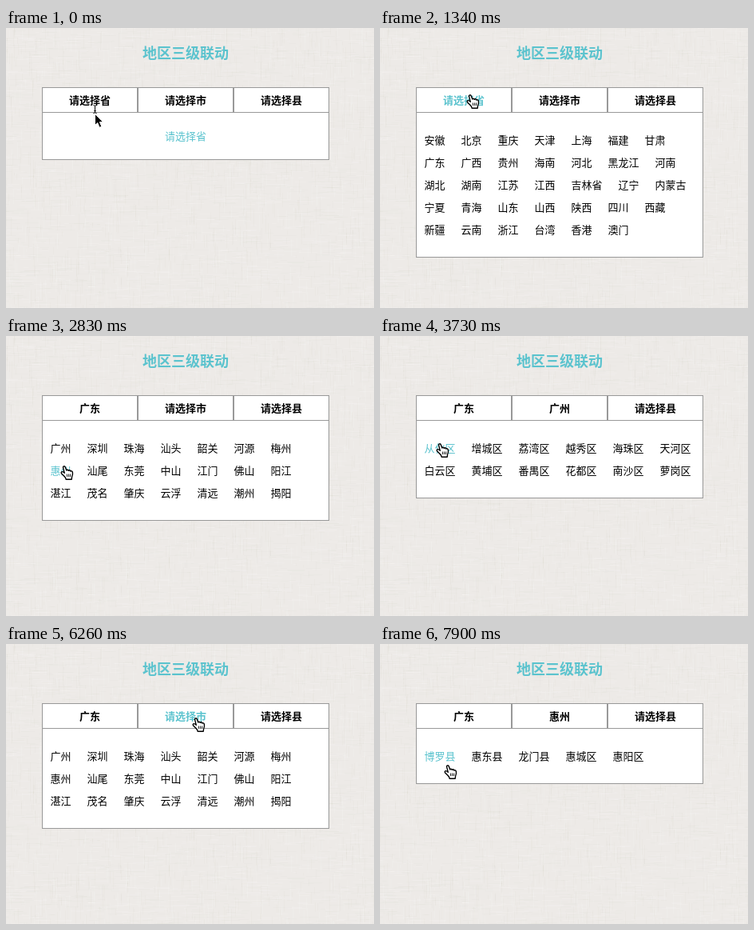
Write an HTML page with a canvas that moves like this. It is 461 px wide and 350 px high and loops after 8 s.

```html
<!DOCTYPE html>
<html lang="zh-CN">
<head>
<meta charset="utf-8">
<title>地区三级联动</title>
<style>
html, body { margin: 0; width: 100%; height: 100%; overflow: hidden; background: #edeae7; }
canvas, svg { position: absolute; left: 0; top: 0; display: block; }
text { font: 13px "Noto Sans CJK SC", "Noto Sans CJK", sans-serif; fill: #000; white-space: pre; }
.mid { text-anchor: middle; }
.bold { font-weight: 700; }
.title { font-size: 18px; }
.on { fill: #5bc3ce; }
.box { fill: #fff; stroke: #999; }
</style>
</head>
<body>
<canvas id="linen" width="461" height="350"></canvas>
<svg width="461" height="350" viewBox="0 0 461 350">
  <defs>
    <g id="hand">
      <path d="M3.6 2.6C3.1 .7 5.6 .1 6.3 1.9L7.8 6.1C8 5 9.9 5 10.3 6.4C10.7 5.4 12.5 5.6 12.8 7C13.5 6.2 15.1 6.8 15.4 8.3C15.8 10.5 15.5 12.2 14.6 14L14.2 17.2H7.2L6.4 15C5 13 3.2 11.6 1.4 9.7C.6 8.2 2.2 7 3.7 8L5.3 9.3Z" fill="#fff" stroke="#000" stroke-width="1.4" stroke-linejoin="round"/>
      <path d="M8.3 10.5L8.7 14M10.5 10.5L10.7 14M12.6 10.5V14" fill="none" stroke="#000" stroke-width=".9"/>
    </g>
    <path id="arrow" d="M0 0V14L3.2 11.1L5.6 16.8L8.3 15.7L5.9 10.1H10.2Z" fill="#000" stroke="#fff"/>
    <path id="beam" d="M-2 -5Q0 -5 0 -3.8Q0 -5 2 -5M0 -4V4M-2 5Q0 5 0 3.8Q0 5 2 5M-1.2 2H1.2" fill="none" stroke="#000"/>
  </defs>
  <text class="mid bold title on" x="225" y="38">地区三级联动</text>
  <g id="picker"></g>
  <g id="pointer"></g>
</svg>
<script>
const LOOP = 8000;
const HINTS = ['请选择省', '请选择市', '请选择县'];
const split = s => s.split('/').map(row => row.split(' '));
const PROVINCES = split('安徽 北京 重庆 天津 上海 福建 甘肃/广东 广西 贵州 海南 河北 黑龙江 河南/湖北 湖南 江苏 江西 吉林省 辽宁 内蒙古/宁夏 青海 山东 山西 陕西 四川 西藏/新疆 云南 浙江 台湾 香港 澳门');
const CITIES = split('广州 深圳 珠海 汕头 韶关 河源 梅州/惠州 汕尾 东莞 中山 江门 佛山 阳江/湛江 茂名 肇庆 云浮 清远 潮州 揭阳');
const DISTRICTS = split('从化区 增城区 荔湾区 越秀区 海珠区 天河区/白云区 黄埔区 番禺区 花都区 南沙区 萝岗区');
const COUNTIES = split('博罗县 惠东县 龙门县 惠城区 惠阳区');

// time, chosen names, list
const views = [
  [0, [], null],
  [1340, [], PROVINCES],
  [2830, ['广东'], CITIES],
  [3730, ['广东', '广州'], DISTRICTS],
  [4920, ['广东', '广州', '从化区'], DISTRICTS],
  [5970, ['广东'], CITIES],
  [7750, ['广东', '惠州'], COUNTIES]
];

// time, x, y, cursor, hovered tab number or item, second cursor [name, x, y]
const moves = [
  [0, 111.5, 107.5, 'arrow', null, ['beam', 111.5, 101.5]],
  [140, 113, 93, 'hand', 0],
  [290, 111, 87, 'hand', 0],
  [440, 108, 83, 'hand', 0],
  [1940, 114, 90, 'hand', 0],
  [2090, 140, 112, 'arrow'],
  [2240, 132, 136, 'arrow'],
  [2390, 97, 158, 'hand', '广西'],
  [2540, 68, 162, 'hand', '广东'],
  [2830, 68, 162, 'hand', '惠州'],
  [3130, 69, 156, 'hand', '惠州'],
  [3280, 70, 144, 'hand', '广州'],
  [3430, 70, 134, 'hand', '广州'],
  [3730, 70, 134, 'hand', '从化区'],
  [4180, 75, 137, 'hand', '从化区'],
  [4330, 80, 140, 'hand', '从化区'],
  [4480, 84, 142, 'hand', '从化区'],
  [5070, 87, 138, 'hand', '从化区'],
  [5220, 108, 130, 'arrow'],
  [5370, 140, 119, 'arrow'],
  [5520, 171.5, 110.5, 'arrow', null, ['arrow', 164.5, 110.5]],
  [5670, 205, 99, 'hand', 1],
  [5820, 233, 92, 'hand', 1],
  [6560, 228, 95, 'hand', 1],
  [6710, 205, 108, 'arrow'],
  [6860, 175, 118, 'arrow'],
  [7000, 146, 132, 'hand', '珠海'],
  [7150, 118, 146, 'hand', '深圳'],
  [7300, 93, 156, 'arrow'],
  [7450, 75, 160, 'hand', '惠州'],
  [7600, 68, 162, 'hand', '惠州'],
  [7750, 76, 154, 'hand', '博罗县'],
  [7900, 80, 151, 'hand', '博罗县']
];

const picker = document.getElementById('picker');
const pointer = document.getElementById('pointer');
const at = (steps, t) => steps.findLast(s => s[0] <= t);
const box = (x, y, w, h) =>
  `<rect class="box" x="${x + .5}" y="${y + .5}" width="${w - 1}" height="${h - 1}"/>`;
const label = (s, x, y, cls, on) =>
  `<text class="${cls}${on ? ' on' : ''}" x="${x}" y="${y}">${s}</text>`;
const cursor = (name, x, y) => `<use href="#${name}" x="${x}" y="${y}"/>`;

function drawPicker(names, list, hover) {
  const bottom = list ? 147 + 28 * list.length : 165;
  let out = box(45, 105, 360, bottom - 105);
  HINTS.forEach((hint, i) => {
    out += box(45 + 120 * i, 74, 120, 32) +
      label(names[i] || hint, 105 + 120 * i, 95, 'mid bold', hover === i);
  });
  if (!list) out += label(HINTS[0], 225, 140, 'mid', true);
  else list.forEach((row, r) => {
    let x = 55.5;
    for (const name of row) {
      out += label(name, x, 145 + 28 * r, '', hover === name);
      x += 13 * name.length + 20;
    }
  });
  picker.innerHTML = out;
}

function paintLinen() {
  const c = document.getElementById('linen').getContext('2d');
  let seed = 7;
  const rnd = n => (seed = seed * 16807 % 2147483647) / 2147483647 * n;
  c.fillStyle = '#edeae7';
  c.fillRect(0, 0, 461, 350);
  for (let i = 0; i < 5000; i++) {
    const len = 3 + rnd(22), flat = rnd(1) < .6;
    c.fillStyle = rnd(1) < .5 ? 'rgba(255,255,255,.1)' : 'rgba(120,110,100,.022)';
    c.fillRect(Math.floor(rnd(481)) - 20, Math.floor(rnd(370)) - 20, flat ? len : 1, flat ? 1 : len);
  }
}

let lastView, lastMove;
function render(t) {
  const view = at(views, t), move = at(moves, t);
  if (view === lastView && move === lastMove) return;
  lastView = view;
  lastMove = move;
  const [, x, y, name, hover, extra] = move;
  drawPicker(view[1], view[2], hover);
  pointer.innerHTML = (extra ? cursor(...extra) : '') + cursor(name, x, y);
}

paintLinen();
render(0);
const start = performance.now();
function tick() {
  render((performance.now() - start) % LOOP);
  requestAnimationFrame(tick);
}
requestAnimationFrame(tick);
</script>
</body>
</html>
```
